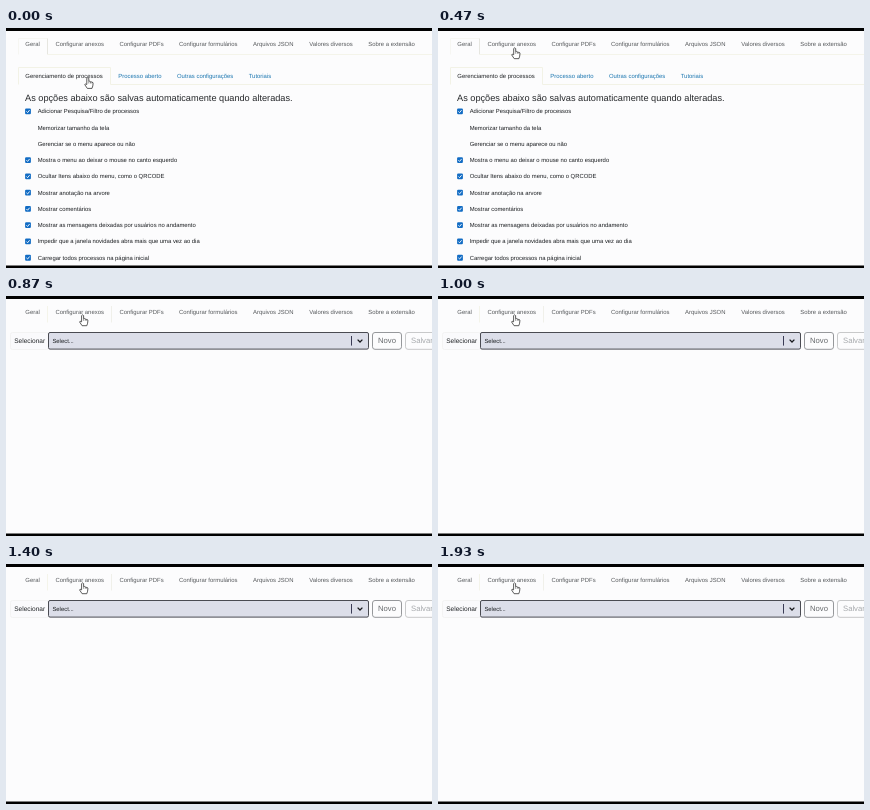
An HTML page with a canvas for the animation above (1990 ms loop, 426x240 px).

```html
<!DOCTYPE html>
<html lang="pt-BR">
<head>
<meta charset="utf-8">
<title>Configurações</title>
<style>
html, body { margin: 0; width: 100%; height: 100%; overflow: hidden; background: #fcfcfd; }
canvas { display: block; width: 426px; height: 240px; }
</style>
</head>
<body>
<canvas id="stage"></canvas>
<script>
const W = 426, H = 240, LOOP = 1990, STEP = 200 / 3, SWITCH = 12;
const canvas = document.getElementById('stage');
const ctx = canvas.getContext('2d');
const dpr = Math.max(1, window.devicePixelRatio || 1);
canvas.width = W * dpr;
canvas.height = H * dpr;

const TABS = [
  ['Geral', 19.3], ['Configurar anexos', 49.5], ['Configurar PDFs', 113.5],
  ['Configurar formulários', 173], ['Arquivos JSON', 247],
  ['Valores diversos', 303.3], ['Sobre a extensão', 362.3]
];
const SUBTABS = [
  ['Gerenciamento de processos', 19.3], ['Processo aberto', 112.3],
  ['Outras configurações', 171], ['Tutoriais', 242.7]
];
const OPTIONS = [
  ['Adicionar Pesquisa/Filtro de processos', 1],
  ['Memorizar tamanho da tela', 0],
  ['Gerenciar se o menu aparece ou não', 0],
  ['Mostra o menu ao deixar o mouse no canto esquerdo', 1],
  ['Ocultar Itens abaixo do menu, como o QRCODE', 1],
  ['Mostrar anotação na arvore', 1],
  ['Mostrar comentários', 1],
  ['Mostrar as mensagens deixadas por usuários no andamento', 1],
  ['Impedir que a janela novidades abra mais que uma vez ao dia', 1],
  ['Carregar todos processos na página inicial', 1]
];
// time in ms, x and y of the fingertip
const PATH = [[0, 81.8, 49.5], [330, 77, 22.8], [530, 76.6, 18.8]];

function text(str, x, y, size, color) {
  ctx.font = size + 'px "Liberation Sans", Arial, sans-serif';
  ctx.fillStyle = color;
  ctx.fillText(str, x, y);
}

function line(points, color, width = 1) {
  ctx.beginPath();
  points.forEach(([x, y]) => ctx.lineTo(x, y));
  ctx.strokeStyle = color;
  ctx.lineWidth = width;
  ctx.stroke();
}

function box(x, y, w, h, r, fill, stroke, width = 1) {
  ctx.beginPath();
  ctx.roundRect(x, y, w, h, r);
  if (fill) {
    ctx.fillStyle = fill;
    ctx.fill();
  }
  if (stroke) {
    ctx.strokeStyle = stroke;
    ctx.lineWidth = width;
    ctx.stroke();
  }
}

function checkbox(x, y) {
  box(x, y, 5.8, 5.8, 1, '#126cc4');
  line([[x + 1.3, y + 3], [x + 2.5, y + 4.2], [x + 4.5, y + 1.7]], '#fff', 0.9);
}

function tabs(second) {
  const edge = '#f4f4ea';
  if (second) {
    line([[41.5, 10], [41.5, 26.5]], edge);
    line([[105.5, 10], [105.5, 26.5]], '#f0f0ea');
  } else {
    line([[12.5, 26.5], [12.5, 10.5], [41.5, 10.5]], '#f6f6f2');
    line([[41.5, 10.5], [41.5, 26.5]], '#e6e6e0');
    line([[41.5, 26.5], [W, 26.5]], edge);
  }
  TABS.forEach(([label, x]) => text(label, x, 18.2, 5.93, '#56595c'));
}

function generalPage() {
  line([[12.5, 56.5], [12.5, 39.5], [104.5, 39.5], [104.5, 56.5], [W, 56.5]], '#f2f2e6');
  SUBTABS.forEach(([label, x], i) =>
    text(label, x, 50.1, 5.93, i ? '#1b76b0' : '#202326'));
  text('As opções abaixo são salvas automaticamente quando alteradas.', 19, 72.8, 9.2, '#26282b');
  OPTIONS.forEach(([label, on], i) => {
    const y = 83.3 + i * 16.27;
    if (on) checkbox(19.1, y - 2.9);
    text(label, 31.7, y + 2, 5.88, '#1a1d20');
  });
}

function attachmentsPage() {
  box(4.5, 36.5, 38, 17, 2, '#fafafc', '#f3f3f3');
  text('Selecionar', 8.2, 47.1, 6.56, '#202326');
  box(42.5, 36.5, 320, 16.6, 1.5, '#dcdee9', '#4a4b52');
  text('Select...', 46.4, 47, 5.9, '#1a1d20');
  line([[345.5, 40], [345.5, 49.6]], '#3a3b55');
  line([[351.6, 43.6], [354, 46], [356.4, 43.6]], '#17181c', 1.3);
  box(366.5, 36.5, 29, 16.8, 2.5, null, '#96989b');
  text('Novo', 372, 47.2, 7.7, '#66696c');
  box(399.5, 36.5, 32, 16.8, 2.5, null, '#c8c9ca');
  text('Salvar', 405, 47.2, 7.7, '#a6a9ac');
}

function hand(x, y) {
  ctx.save();
  ctx.translate(x, y);
  ctx.beginPath();
  ctx.moveTo(-1, 0.8);
  ctx.quadraticCurveTo(0, -0.7, 1, 0.8);
  ctx.lineTo(1, 4);
  ctx.quadraticCurveTo(2, 3.2, 2.7, 4.3);
  ctx.quadraticCurveTo(3.6, 3.7, 4.1, 4.8);
  ctx.quadraticCurveTo(5.3, 4.6, 5.3, 5.8);
  ctx.lineTo(5, 8.4);
  ctx.lineTo(4.2, 10.9);
  ctx.lineTo(-0.5, 10.9);
  ctx.lineTo(-3, 7.2);
  ctx.quadraticCurveTo(-2.9, 5.7, -1, 7);
  ctx.closePath();
  ctx.fillStyle = '#fff';
  ctx.fill();
  ctx.strokeStyle = '#333';
  ctx.lineWidth = 0.8;
  ctx.lineJoin = 'round';
  ctx.stroke();
  for (const x of [1, 2.7, 4.1]) line([[x, 4.4], [x, 6]], '#333', 0.5);
  ctx.restore();
}

function pointer(t) {
  const i = PATH.findIndex(p => p[0] > t);
  if (i < 0) return PATH[PATH.length - 1].slice(1);
  const [t0, x0, y0] = PATH[i - 1], [t1, x1, y1] = PATH[i];
  const u = (t - t0) / (t1 - t0), k = u * u * (3 - 2 * u);
  return [x0 + (x1 - x0) * k, y0 + (y1 - y0) * k];
}

function draw(t) {
  const step = Math.floor((t + 5) / STEP);
  const second = step >= SWITCH;
  ctx.setTransform(dpr, 0, 0, dpr, 0, 0);
  ctx.textRendering = 'geometricPrecision';
  ctx.fillStyle = '#fcfcfd';
  ctx.fillRect(0, 0, W, H);
  tabs(second);
  if (second) attachmentsPage();
  else generalPage();
  hand(...pointer(step * STEP));
  ctx.fillStyle = '#000';
  ctx.fillRect(0, 0, W, 3);
  ctx.fillRect(0, 237.5, W, 2.5);
}

const start = performance.now();
function tick() {
  draw((performance.now() - start) % LOOP);
  requestAnimationFrame(tick);
}
tick();
</script>
</body>
</html>
```
